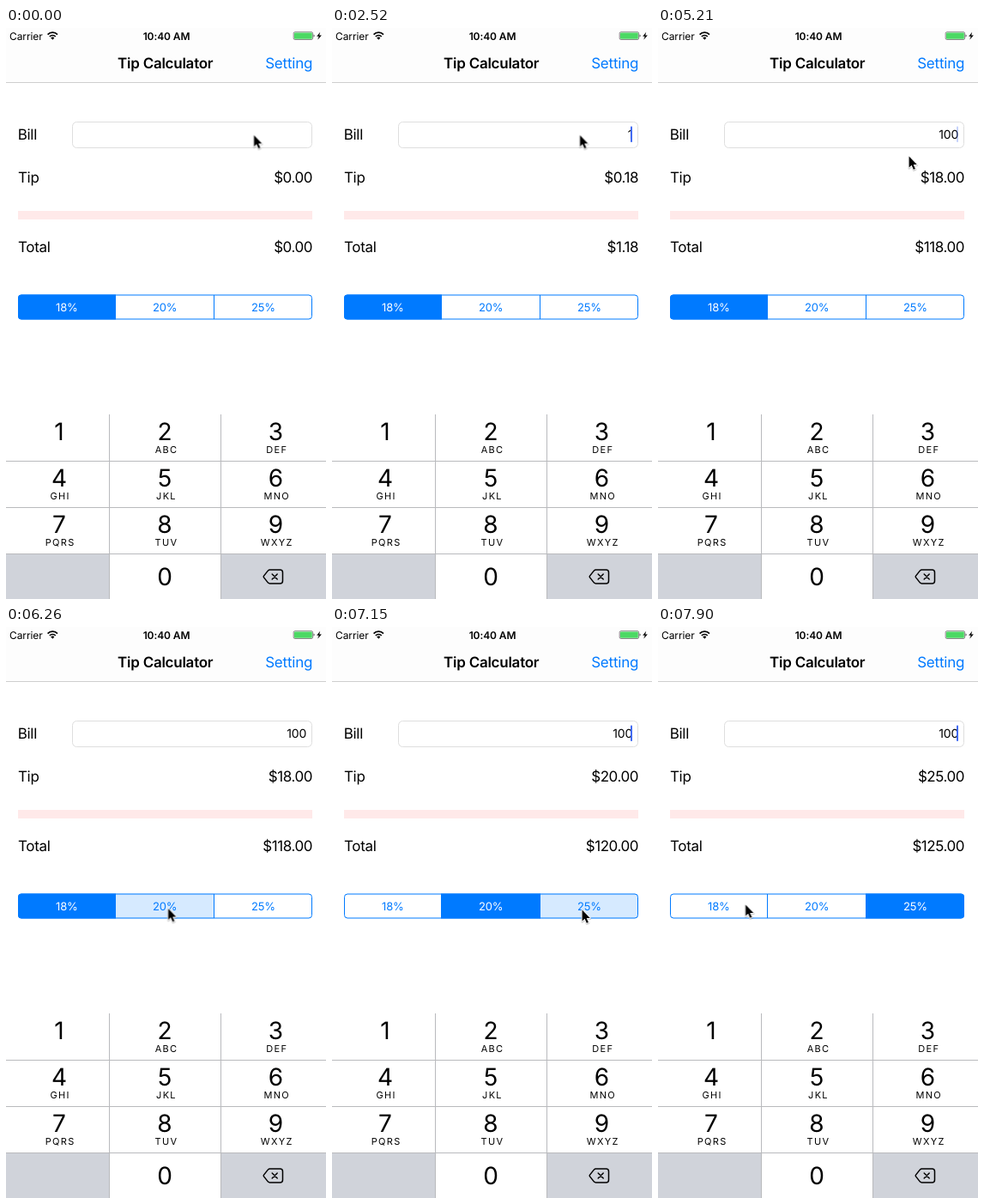
Write an HTML page that moves like this. It is 373x665 px and loops after 8000 ms.

```html
<!DOCTYPE html>
<html lang="en">
<head>
<meta charset="utf-8">
<title>Tip Calculator</title>
<style>
html, body { margin: 0; width: 100%; height: 100%; overflow: hidden; background: #fff; }
svg { display: block; overflow: hidden; }
text { font-family: Inter, Roboto, sans-serif; fill: #000; text-rendering: geometricPrecision; white-space: pre; }
.label { font-size: 17px; letter-spacing: -.3px; }
.title { font-size: 17px; font-weight: 600; letter-spacing: -.25px; text-anchor: middle; }
.link { font-size: 17px; letter-spacing: -.2px; fill: #007aff; text-anchor: end; }
.status { font-size: 12px; letter-spacing: -.1px; }
.money { font-size: 17px; letter-spacing: -.45px; text-anchor: end; }
.bill { font-size: 14px; letter-spacing: -.1px; text-anchor: end; }
.seg text { font-size: 13px; letter-spacing: -.15px; text-anchor: middle; fill: #007aff; }
.seg rect { fill: #007aff; fill-opacity: 0; }
.key { font-size: 28px; text-anchor: middle; }
.abc { font-size: 11px; letter-spacing: 1.3px; text-anchor: middle; }

.reel, .caret, .mouse, .seg rect, .seg text { animation: 8s steps(1, end) -4ms infinite; }
.reel { animation-name: reel; }
.caret { animation-name: caret; }
.mouse { animation-name: mouse; }
.s1 rect { animation-name: fill1; }
.s2 rect { animation-name: fill2; }
.s3 rect { animation-name: fill3; }
.s1 text { animation-name: ink1; }
.s2 text { animation-name: ink2; }
.s3 text { animation-name: ink3; }

/* Each row of a reel is 40px tall */
@keyframes reel {
  0% { transform: translateY(0); }
  31.5% { transform: translateY(-40px); }
  42.75% { transform: translateY(-80px); }
  44.625% { transform: translateY(-120px); }
  80.125% { transform: translateY(-160px); }
  91.25%, 100% { transform: translateY(-200px); }
}
@keyframes caret {
  0%, 11%, 24.125%, 40.875%, 54%, 67%, 78.25%, 91.25% { opacity: 0; }
  1.75%, 16.625%, 27.875%, 42.75%, 59.625%, 72.625%, 85.625%, 96.875%, 100% { opacity: 1; }
  22.25% { opacity: .12; }
  9.25%, 14.75%, 39%, 52.125%, 57.75%, 65.125%, 70.75%, 83.75% { opacity: .3; }
}
@keyframes mouse {
  0% { transform: translate(288.5px, 123.5px); }
  57.75% { transform: translate(289px, 130px); }
  59.625% { transform: translate(291px, 141px); }
  61.5% { transform: translate(292px, 148px); }
  70.75% { transform: translate(281px, 176px); }
  72.625% { transform: translate(254px, 237px); }
  74.5% { transform: translate(216px, 296px); }
  76.375% { transform: translate(191px, 325px); }
  78.25% { transform: translate(188.5px, 326.5px); }
  80.125% { transform: translate(196px, 331px); }
  81.875% { transform: translate(229.5px, 350.5px); }
  83.75% { transform: translate(244px, 359px); }
  85.625% { transform: translate(268px, 345px); }
  87.5% { transform: translate(290px, 329px); }
  89.375% { transform: translate(291px, 328px); }
  91.25% { transform: translate(262.5px, 417.5px); }
  93.125% { transform: translate(232px, 402px); }
  95% { transform: translate(164px, 359px); }
  96.875% { transform: translate(114.5px, 329.5px); }
  98.75%, 100% { transform: translate(101.5px, 322px); }
}
@keyframes fill1 {
  0% { fill-opacity: 1; }
  80.125% { fill-opacity: .1; }
  81.875%, 100% { fill-opacity: 0; }
}
@keyframes fill2 {
  0%, 93.125%, 100% { fill-opacity: 0; }
  78.25% { fill-opacity: .16; }
  80.125% { fill-opacity: .92; }
  81.875% { fill-opacity: 1; }
  91.25% { fill-opacity: .1; }
}
@keyframes fill3 {
  0% { fill-opacity: 0; }
  89.375% { fill-opacity: .16; }
  91.25% { fill-opacity: .92; }
  93.125%, 100% { fill-opacity: 1; }
}
@keyframes ink1 {
  0% { fill: #fff; }
  80.125%, 100% { fill: #007aff; }
}
@keyframes ink2 {
  0%, 91.25%, 100% { fill: #007aff; }
  80.125% { fill: #e4f0ff; }
  81.875% { fill: #fff; }
}
@keyframes ink3 {
  0% { fill: #007aff; }
  91.25% { fill: #e4f0ff; }
  93.125%, 100% { fill: #fff; }
}
</style>
</head>
<body>
<svg width="373" height="665" viewBox="0 0 373 665">
  <defs>
    <clipPath id="pill"><rect x="14" y="310.5" width="343" height="29" rx="4"/></clipPath>
  </defs>
  <rect width="373" height="665" fill="#fff"/>

  <!-- Status bar -->
  <rect width="373" height="63" fill="#fdfdfd"/>
  <text class="status" x="4" y="13.6">Carrier</text>
  <g fill="none" stroke="#000" stroke-width="1.7">
    <path d="M48.6 7.6a8 8 0 0 1 11.4 0"/>
    <path d="M50.8 10a5 5 0 0 1 7 0"/>
  </g>
  <path d="M52.2 11.6a3 3 0 0 1 4.2 0l-2.1 2.2z"/>
  <text class="status" x="187" y="13.6" font-weight="600" text-anchor="middle">10:40 AM</text>
  <rect x="335.2" y="4.7" width="22.4" height="8.8" rx="1.6" fill="#fff" stroke="#555" stroke-width=".7"/>
  <rect x="336" y="5.5" width="20.8" height="7.2" rx=".8" fill="#4cd964"/>
  <path d="M358.5 7.4q1.2.4 1.2 1.7t-1.2 1.7z" fill="#555"/>
  <path d="M366.2 4.8l-4 5h2.5l-1.4 4 4.6-5.3h-2.7z"/>

  <!-- Navigation -->
  <text class="title" x="185.7" y="47">Tip Calculator</text>
  <text class="link" x="357.3" y="47">Setting</text>
  <rect y="63" width="373" height="1" fill="#cfcfcf"/>

  <!-- Form -->
  <text class="label" x="13.7" y="129.5">Bill</text>
  <text class="label" x="13.9" y="180">Tip</text>
  <text class="label" x="13.9" y="261.2">Total</text>
  <rect x="77.5" y="109.5" width="279" height="30" rx="5" fill="#fff" stroke="#dedede"/>
  <rect x="14" y="213" width="343" height="10" fill="#ffe9e9"/>

  <svg x="250" y="104" width="110" height="40">
    <g class="reel bill">
      <text x="100.3" y="65.4">1</text>
      <text x="100.3" y="105.4">10</text>
      <text x="100.3" y="145.4">100</text>
      <text x="100.3" y="185.4">100</text>
      <text x="100.3" y="225.4">100</text>
    </g>
  </svg>
  <svg x="250" y="154" width="110" height="40">
    <g class="reel money">
      <text x="107" y="26">$0.00</text>
      <text x="107" y="66">$0.18</text>
      <text x="107" y="106">$1.80</text>
      <text x="107" y="146">$18.00</text>
      <text x="107" y="186">$20.00</text>
      <text x="107" y="226">$25.00</text>
    </g>
  </svg>
  <svg x="250" y="235.2" width="110" height="40">
    <g class="reel money">
      <text x="107" y="26">$0.00</text>
      <text x="107" y="66">$1.18</text>
      <text x="107" y="106">$11.80</text>
      <text x="107" y="146">$118.00</text>
      <text x="107" y="186">$120.00</text>
      <text x="107" y="226">$125.00</text>
    </g>
  </svg>
  <rect class="caret" x="348" y="114.5" width="2" height="18.5" rx=".8" fill="#426bf2"/>

  <!-- Segments -->
  <g clip-path="url(#pill)">
    <g class="seg s1"><rect x="14" y="310" width="114" height="30"/><text x="70.9" y="329.6">18%</text></g>
    <g class="seg s2"><rect x="127" y="310" width="116" height="30"/><text x="185.2" y="329.6">20%</text></g>
    <g class="seg s3"><rect x="242" y="310" width="115" height="30"/><text x="300" y="329.6">25%</text></g>
  </g>
  <g fill="none" stroke="#007aff">
    <rect x="14.5" y="311" width="342" height="28" rx="3.5"/>
    <path d="M127.5 311v28M242.5 311v28"/>
  </g>

  <!-- Keypad -->
  <path d="M0 612h120.5v53H0zM250.5 612H373v53H250.5z" fill="#d0d3da"/>
  <path d="M120.5 450v215M250.5 450v215M0 504.5h373M0 558.5h373M0 612.5h373" fill="none" stroke="#b9babd"/>
  <g class="key">
    <text x="62" y="480">1</text><text x="185" y="480">2</text><text x="314.5" y="480">3</text>
    <text x="62" y="534">4</text><text x="185" y="534">5</text><text x="314.5" y="534">6</text>
    <text x="62" y="588">7</text><text x="185" y="588">8</text><text x="314.5" y="588">9</text>
    <text x="185" y="649">0</text>
  </g>
  <g class="abc">
    <text x="187" y="495.3">ABC</text><text x="315.8" y="495.3">DEF</text>
    <text x="63.2" y="549.3">GHI</text><text x="187" y="549.3">JKL</text><text x="315.8" y="549.3">MNO</text>
    <text x="63.2" y="603.3">PQRS</text><text x="187" y="603.3">TUV</text><text x="315.8" y="603.3">WXYZ</text>
  </g>
  <g fill="none" stroke="#000" stroke-width="1.5" stroke-linejoin="round" stroke-linecap="round">
    <path d="M307.5 631h12q3 0 3 3v10q0 3-3 3h-12q-1.2 0-2-.9l-5-6.2q-.7-.9 0-1.8l5-6.2q.8-.9 2-.9z"/>
    <path d="M310.2 636l6 6M316.2 636l-6 6"/>
  </g>

  <!-- Pointer -->
  <g class="mouse">
    <path id="arrow" d="M.6 1.6v13l3-2.8 2.2 5 2.1-.9-2.2-4.9h4.1z" fill="#000" stroke="#000" stroke-opacity=".18" stroke-width="2.6" stroke-linejoin="round" transform="translate(.2 .8)"/>
    <path d="M.6 1.6v13l3-2.8 2.2 5 2.1-.9-2.2-4.9h4.1z" fill="#000" stroke="#fff" stroke-width="1.8" stroke-linejoin="round" paint-order="stroke"/>
  </g>
</svg>
</body>
</html>
```
